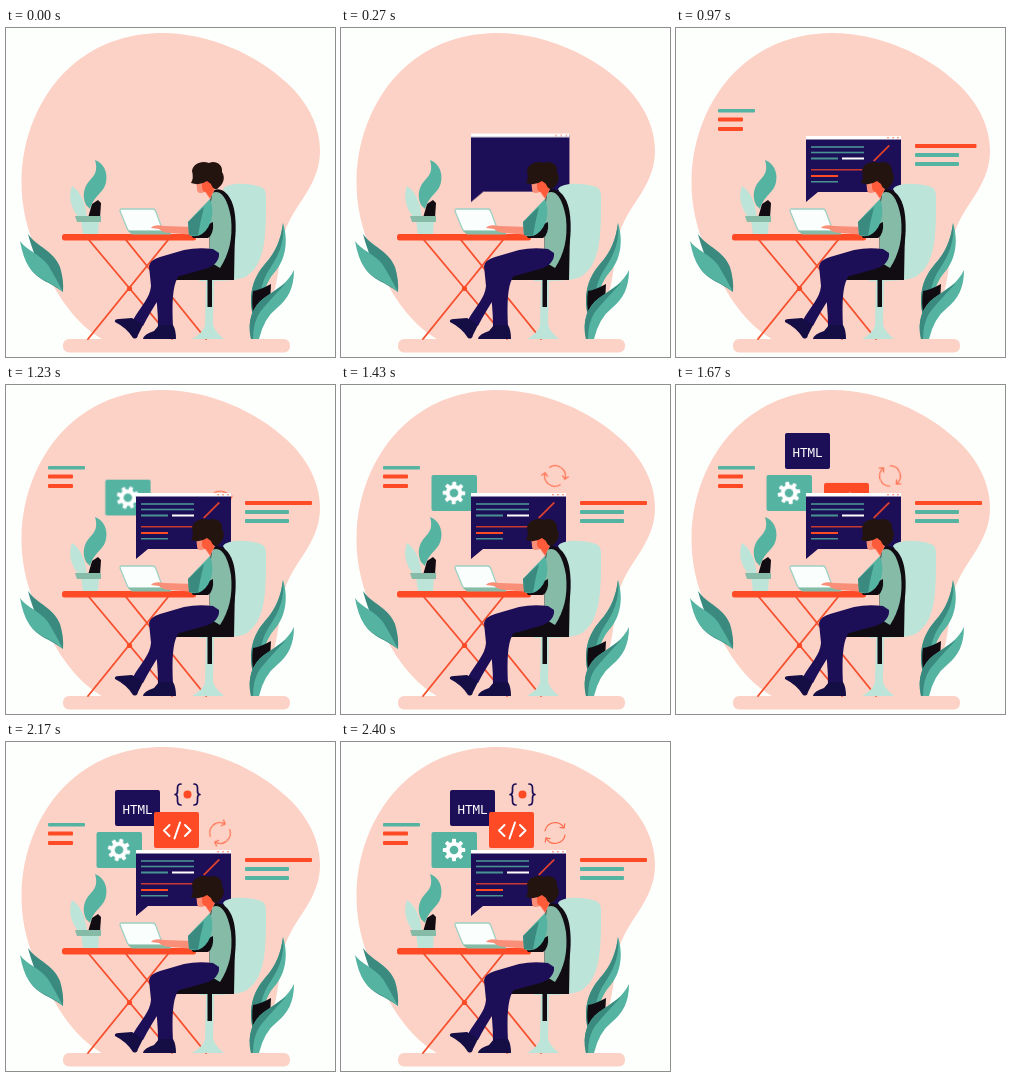
Write an HTML page that moves like this. It is 329 by 329 pixels and loops after 2730 ms.

```html
<!DOCTYPE html>
<html lang="en">
<head>
<meta charset="utf-8">
<title>Developer at a desk</title>
<style>
html, body { margin: 0; width: 100%; height: 100%; overflow: hidden; background: #fdfffd; }
svg { display: block; width: 100vw; height: 100vh; }

.pink { fill: #fdd2c6; }
.red { fill: #ff4a26; }
.teal { fill: #55b3a2; }
.deep { fill: #3a8a80; }
.sage { fill: #86bba7; }
.pale { fill: #bce4d8; }
.navy { fill: #1d0f57; }
.shoe { fill: #150e45; }
.dark { fill: #110b12; }
.skin { fill: #f98f78; }
.white { fill: #fff; }
.line { fill: none; stroke-linecap: round; stroke-linejoin: round; }

.anim { animation: 2730ms linear infinite; }
.screen { animation-name: pop; transform-origin: 130px 174px; }
.grow { transform-box: fill-box; transform-origin: 0 50%; }
.code1 { animation-name: code1; }
.code2 { animation-name: code2; }
.left { animation-name: left; }
.right { animation-name: right; }
.long { animation-name: long; }
.gear { animation-name: gear; }
.sync { animation-name: sync; }
.html { animation-name: html; }
.tag { animation-name: tag; }
.braces { animation-name: braces; }
.spin { animation-name: spin; }

@keyframes pop {
  0%, 1.1% { transform: scale(0); animation-timing-function: ease-out; }
  6.8% { transform: scale(1.11); animation-timing-function: ease-in-out; }
  12%, 100% { transform: none; }
}
@keyframes code1 {
  0%, 11% { transform: scaleX(0); animation-timing-function: ease-out; }
  17%, 100% { transform: none; }
}
@keyframes code2 {
  0%, 14% { transform: scaleX(0); animation-timing-function: ease-out; }
  20%, 100% { transform: none; }
}
@keyframes left {
  0%, 20.9% { transform: scaleX(0); animation-timing-function: ease-out; }
  31%, 100% { transform: none; }
}
@keyframes right {
  0%, 24% { transform: scaleX(0); animation-timing-function: ease-out; }
  34.5%, 100% { transform: none; }
}
@keyframes long {
  0%, 24% { transform: scaleX(0); animation-timing-function: ease-out; }
  39%, 100% { transform: none; }
}
@keyframes gear {
  0%, 40.2% { opacity: 0; transform: translate(45px, 24px); }
  40.3% { opacity: 1; transform: translate(45px, 24px); animation-timing-function: ease-out; }
  48%, 100% { opacity: 1; transform: none; }
}
@keyframes sync {
  0%, 44% { opacity: 0; transform: translateY(32px); }
  44.1% { opacity: 1; transform: translateY(32px); animation-timing-function: ease-out; }
  52%, 100% { opacity: 1; transform: none; }
}
@keyframes html {
  0%, 52.7% { opacity: 0; transform: translate(24px, 62px); }
  52.8% { opacity: 1; transform: translate(24px, 62px); animation-timing-function: ease-out; }
  59.5%, 100% { opacity: 1; transform: none; }
}
@keyframes tag {
  0%, 59.7% { opacity: 0; transform: translateY(39px); }
  59.8% { opacity: 1; transform: translateY(39px); animation-timing-function: ease-out; }
  67.5%, 100% { opacity: 1; transform: none; }
}
@keyframes braces {
  0%, 68.3% { opacity: 0; transform: translateY(31px); }
  68.4% { opacity: 1; transform: translateY(31px); animation-timing-function: ease-in-out; }
  77.5%, 100% { opacity: 1; transform: none; }
}
@keyframes spin {
  0%, 40% { transform: rotate(0); }
  87.9%, 100% { transform: rotate(180deg); }
}
</style>
</head>
<body>
<svg viewBox="0 0 329 329">
  <defs>
    <rect id="tooth" x="-2" y="-11.2" width="4" height="5" rx=".8"/>
    <g id="arrow" class="line" stroke="#ff6b4a" stroke-width="1.2">
      <path d="M-10 -2A10.200 10.200 0 0 1 9 -5"/>
      <path d="M9.800 -9.200L9 -5L5 -5.600"/>
    </g>
  </defs>

  <!-- backdrop -->
  <path class="pink" d="M157 5C202 5 250 26 281 55C304 76 314 101 314 123C314 145 303 162 292 178C283 192 276 206 274 224C273 255 262 295 248 312H98C80 303 60 282 46 255C29 222 15.500 194 15.500 154C15.500 108 35 62 70 34C97 13 126 5 157 5Z"/>
  <rect class="pink" x="57" y="311" width="227" height="13.500" rx="6"/>

  <!-- floor plants -->
  <path class="deep" d="M22 206C31 219 47 222 54 239Q58 252 57 264C46 255 31 252 24 240Q25 228 28 225Q24 214 22 206Z"/>
  <path class="teal" d="M14 213C20 222 34 226 42 237Q50 250 57 264C46 254 30 251 23 239Q17 230 14 213Z"/>
  <path class="teal" d="M277 195C283 214 279 233 268 245Q259 255 253 282L247 288C242 266 247 250 259 236C270 224 275 211 277 195Z"/>
  <path class="deep" d="M277 195C279 216 271 230 263 242Q254 255 252 283L247 288C242 266 247 250 259 236C270 224 275 211 277 195Z"/>
  <path class="dark" d="M247 263Q254 262 265 256L264 274L248 290Q245 275 247 263Z"/>
  <path class="teal" d="M288 242C288 260 282 271 271 280Q258 290 253 311H245C241 293 246 279 258 270C271 261 282 255 288 242Z"/>
  <path class="deep" d="M280 255Q262 274 254 284Q247 294 247 311H245C241 293 246 279 258 270Z"/>

  <!-- side notes -->
  <g class="teal">
    <rect class="anim grow left" x="42" y="81" width="37" height="3.500" rx="1"/>
    <rect class="anim grow right" x="239" y="125" width="44" height="4" rx="1"/>
    <rect class="anim grow right" x="239" y="134" width="44" height="4" rx="1"/>
  </g>
  <g class="red">
    <rect class="anim grow left" x="42" y="89.500" width="25" height="4" rx="1"/>
    <rect class="anim grow left" x="42" y="99" width="25" height="4" rx="1"/>
    <rect class="anim grow long" x="239" y="116" width="67" height="4" rx="1"/>
  </g>

  <!-- badges, rising from behind the screen -->
  <g class="anim braces">
    <g class="line" stroke="#1d0f57" stroke-width="1.700">
      <path d="M175 42Q171.500 42 171.500 46V49Q171.500 52.500 169 52.500Q171.500 52.500 171.500 56V59Q171.500 63 175 63"/>
      <path d="M188 42Q191.500 42 191.500 46V49Q191.500 52.500 194 52.500Q191.500 52.500 191.500 56V59Q191.500 63 188 63"/>
    </g>
    <circle class="red" cx="181.500" cy="52.500" r="4"/>
  </g>
  <g class="anim html">
    <rect class="navy" x="109" y="48" width="45" height="36" rx="2"/>
    <text class="white" x="131.500" y="71.800" text-anchor="middle" font-family="DejaVu Sans Mono, monospace" font-size="12.500">HTML</text>
  </g>
  <g class="anim gear">
    <rect class="teal" x="90.500" y="90" width="45.500" height="36" rx="2"/>
    <g transform="translate(113 108)">
      <g class="anim spin white">
        <use href="#tooth"/>
        <use href="#tooth" transform="rotate(45)"/>
        <use href="#tooth" transform="rotate(90)"/>
        <use href="#tooth" transform="rotate(135)"/>
        <use href="#tooth" transform="rotate(180)"/>
        <use href="#tooth" transform="rotate(225)"/>
        <use href="#tooth" transform="rotate(270)"/>
        <use href="#tooth" transform="rotate(315)"/>
        <circle r="6.300" fill="none" stroke="#fff" stroke-width="4"/>
      </g>
    </g>
  </g>
  <g class="anim tag">
    <rect class="red" x="148" y="70" width="45" height="36" rx="2"/>
    <path class="line" d="M163.500 83L158 88.500L163.500 94M179 83L184.500 88.500L179 94M174 80.500L168.500 96.500" stroke="#fff" stroke-width="2"/>
  </g>
  <g class="anim sync">
    <g transform="translate(214 91)">
      <g class="anim spin">
        <use href="#arrow"/>
        <use href="#arrow" transform="rotate(180)"/>
      </g>
    </g>
  </g>

  <!-- screen -->
  <g class="anim screen">
    <path class="navy" d="M130 109H225V164H142L130 174Z"/>
    <rect class="white" x="130" y="108" width="95" height="3.500"/>
    <g class="red">
      <circle cx="212" cy="109.800" r=".7"/>
      <circle cx="217" cy="109.800" r=".7"/>
      <circle cx="222" cy="109.800" r=".7"/>
    </g>
    <g class="teal" opacity=".8">
      <rect class="anim grow code1" x="135" y="118.200" width="53" height="1.600"/>
      <rect class="anim grow code1" x="135" y="123.700" width="53" height="1.600"/>
      <rect class="anim grow code1" x="135" y="129.500" width="27" height="2"/>
      <rect class="anim grow code2" x="135" y="153" width="27" height="1.500"/>
    </g>
    <rect class="anim grow code1 white" x="166" y="129.500" width="22" height="2"/>
    <g class="red">
      <rect class="anim grow code2" x="135" y="141" width="53" height="1.500" opacity=".75"/>
      <rect class="anim grow code2" x="135" y="147" width="27" height="2"/>
      <path class="anim grow code2" d="M197 132.500L212.500 117L214 118L198.500 133.500Z" opacity=".85"/>
    </g>
  </g>

  <!-- table -->
  <path class="line" d="M83 212L166 311M162 212L82 311M120 212L200 311" stroke="#f5512f" stroke-width="1.900"/>
  <circle class="red" cx="123.500" cy="260.500" r="2.600"/>
  <rect class="red" x="56" y="206" width="134" height="6.500" rx="2.500"/>

  <!-- potted plant -->
  <path class="pale" d="M66 158C75 164 80 176 81 192H75C67 184 61 172 66 158Z"/>
  <path class="dark" d="M82 190L86 176L92 172L95 175L94 190Z"/>
  <path class="teal" d="M89 132C98 135 102 145 100 154C98 165 88 167 84 181L80 177C75 166 79 157 85 151C91 145 91 139 89 132Z"/>
  <path class="pale" d="M75 192H93L92 206H77Z"/>
  <path class="sage" d="M69 188H95V194H71Z"/>

  <!-- laptop -->
  <path d="M115 181H147Q149 181 150 184L157 203H124Q122 203 121 200L114 183Q114 181 115 181Z" fill="#fafffd" stroke="#9fd0c3" stroke-width="1.300"/>
  <path class="sage" d="M122 203H165V206.500H126Z"/>

  <!-- chair -->
  <path class="pale" d="M217 161C222 154 242 155 255 159C261 161 260 168 260 180C260 215 257 237 241 248C233 253 214 253 193 253V249C218 247 228 228 229 205C230 187 223 171 217 161Z"/>
  <path class="pale" d="M200 252H208L207 296Q208 303 218 311H186Q198 304 199 297Z"/>
  <rect class="dark" x="201.500" y="252" width="4.500" height="27"/>

  <!-- person -->
  <path class="dark" d="M163 252V249L196 238L214 230L222 190L229 200L228 252Z"/>
  <path class="dark" d="M205 164C215 156 225 167 228 181C232 201 229 232 217 246L204 243L203 190Z"/>
  <path class="sage" d="M206 165C216 160 222 173 225 190C227 211 223 226 214 240L204 234L203 190Z"/>
  <path class="navy" d="M148 240L176 240L171 251Q165 262 167 299H152Q152 276 148 256Z"/>
  <path class="shoe" d="M153 297H167Q170 302 170 311H137Q138 306 148 303Z"/>
  <path class="navy" d="M178 222Q192 219 207 221L213 225Q214 236 199 241L170 249C160 259 148 277 137 298L127 292C135 278 144 270 145 258L143 238Q144 232 154 229Z"/>
  <path class="shoe" d="M126 290L137 297L132 307Q131 312 127 310Q121 300 109 294Q108 291 113 291Z"/>
  <path class="skin" d="M187 199L158 198Q148 196 145 200L153 201Q157 205 165 205L188 207Z"/>
  <path class="dark" d="M184 205L207 194Q208 206 202 210H187Z"/>
  <path class="teal" d="M204 171C209 183 206 199 196 206Q190 210 183 207L182 194Q192 183 204 171Z"/>
  <path class="deep" d="M182 194Q190 186 198 179Q194 194 192 208L183 207Z"/>
  <path class="skin" d="M190 151H205L209 161L204 171Q201 167 199 164Q191 167 191 161Z"/>
  <path class="red" d="M196 154L205 152L208 162L204 170L200 164Q197 164 196 160Z" opacity=".75"/>
  <path d="M185 155Q188 150 186 143C187 136 195 132 203 135C209 132 217 136 216 144C220 150 217 157 211 161Q207 162 205 156L201 153Q194 158 185 155Z" fill="#241410"/>
</svg>
</body>
</html>
```
